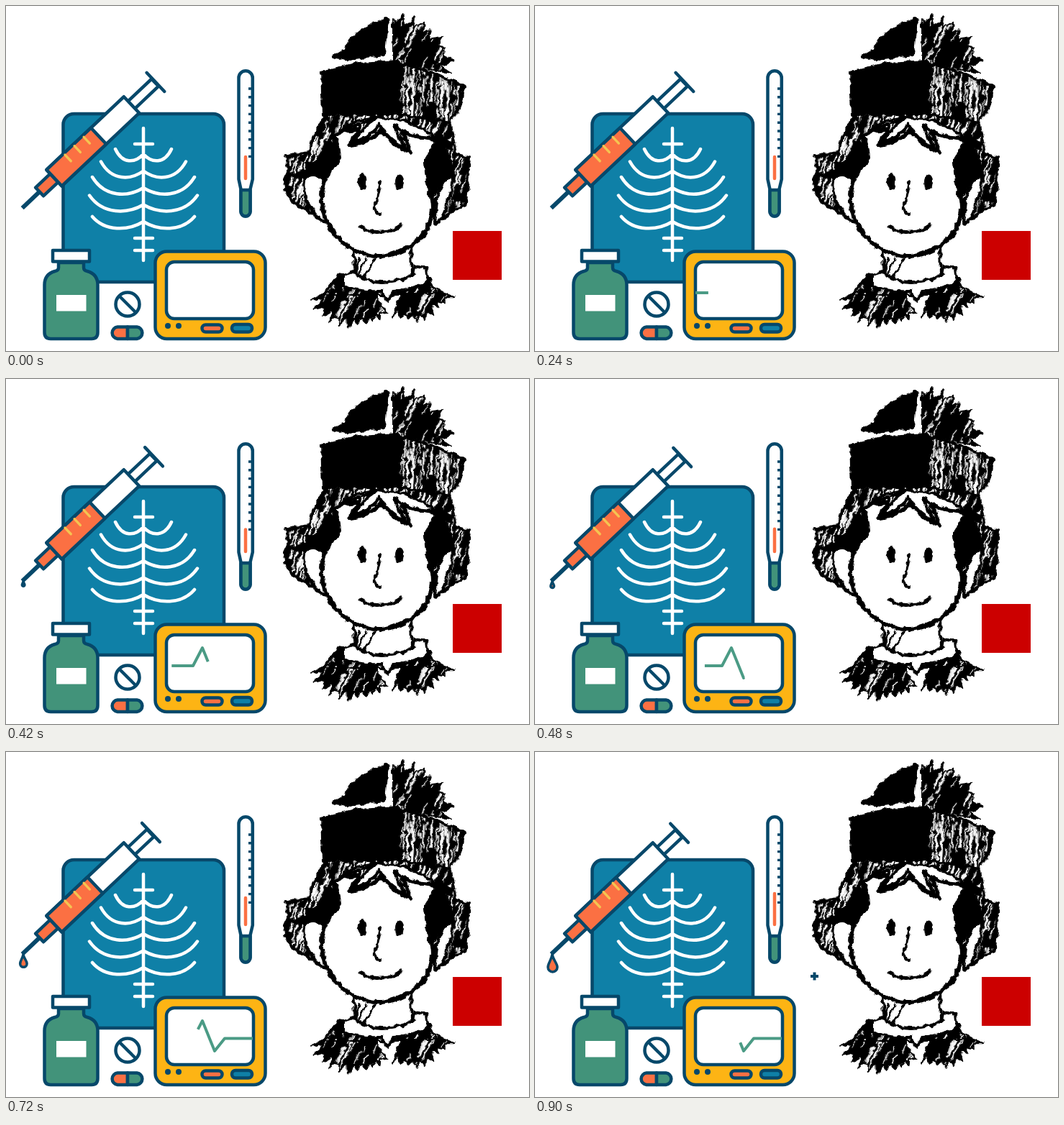
Animation, 727 px wide and 480 px high, one loop 0.96 s. Source, as an HTML page:

```html
<!DOCTYPE html>
<html lang="en">
<head>
<meta charset="utf-8">
<title>Medical kit</title>
<style>
  html, body { margin: 0; width: 100%; height: 100%; overflow: hidden; background: #fff; }
  svg { display: block; }
  .kit { stroke: #06486a; stroke-width: 4.5; stroke-linejoin: round; fill: #fff; }
  .blue { fill: #0f80a7; }
  .green { fill: #42937a; }
  .orange { fill: #fb7043; }
  .yellow { fill: #fdb414; }
  .dark { fill: #06486a; stroke: none; }
  .line { fill: none; stroke-linecap: round; }
  .ink { stroke: #000; stroke-width: 4; stroke-linejoin: round; stroke-linecap: round; filter: url(#rough); }
  .paper { fill: #fff; }
  .band { fill: url(#band); }
  .hair { fill: url(#hair); }
  .fur { fill: url(#fur); stroke-width: 2; }
</style>
</head>
<body>
<svg width="727" height="480" viewBox="0 0 727 480">
  <defs id="defs">
    <filter id="rough" color-interpolation-filters="sRGB">
      <feTurbulence type="fractalNoise" baseFrequency=".12" numOctaves="2" seed="4"/>
      <feDisplacementMap in="SourceGraphic" scale="7" xChannelSelector="R" yChannelSelector="G"/>
    </filter>
  </defs>

  <g class="kit">
    <rect class="blue" x="79.5" y="150" width="223.5" height="234" rx="15"/>
    <path id="bones" class="line" stroke="#fff"/>

    <!-- syringe, drawn along its axis -->
    <g transform="translate(174.5 137.5) rotate(136.6)">
      <g id="plunger">
        <path d="M8 -7H-45V7H8Z"/>
        <path class="line" d="M-46 -18V18"/>
      </g>
      <path d="M176 0H209" stroke-width="6"/>
      <path class="orange" d="M148 -8H176V8H148Z"/>
      <path d="M0 -15.5H148V15.5H0Z"/>
      <path id="liquid" class="orange"/>
      <path class="line" d="M79 1V13M97 1V13M115 1V13" stroke="#f5c451" stroke-width="3.4"/>
    </g>
    <path id="drop" class="orange" vector-effect="non-scaling-stroke" stroke-width="3.5"
      d="M0 0C1 8 7 12 7 18A6.5 6.5 0 0 1 -6 18C-6 12 -1 8 0 0Z"/>

    <!-- thermometer -->
    <path d="M323.5 100A9.6 9.6 0 0 1 342.8 100V241L339.5 255V286A6.5 6.5 0 0 1 326.5 286V255L323.5 241Z"/>
    <path class="green" d="M326.5 256H339.5V286A6.5 6.5 0 0 1 326.5 286Z"/>
    <path id="scale" stroke-width="3.4"/>
    <path id="mercury" class="line" stroke="#fb7043"/>

    <!-- bottle and pills -->
    <path class="green" d="M73 357V364Q73 368 68 369Q53.5 373 53.5 388V454Q53.5 463 62 463H119Q127.5 463 127.5 454V388Q127.5 373 113 369Q108 368 108 364V357Z"/>
    <path d="M65 340H116V355.5H65Z"/>
    <path stroke="none" d="M70 402H111.5V424.5H70Z"/>
    <circle cx="169" cy="415" r="16.5"/>
    <path d="M158 404L180 426"/>
    <path class="orange" d="M169 446.5H155A8.3 8.3 0 0 0 155 463H169Z"/>
    <path class="green" d="M169 446.5H182A8.3 8.3 0 0 1 182 463H169Z"/>

    <!-- monitor -->
    <rect class="yellow" x="207.5" y="341.5" width="153" height="121.5" rx="16"/>
    <rect x="223" y="356" width="121" height="79" rx="11"/>
    <path id="pulse" class="line" pathLength="174" d="M223 399H260L273 374L290 416L304 398.5H343"
      stroke="#4b9b85" stroke-width="4" style="stroke-linecap:butt"/>
    <circle class="dark" cx="225" cy="445" r="4"/>
    <circle class="dark" cx="240" cy="445" r="4"/>
    <rect class="orange" x="272.5" y="443.5" width="28" height="10" rx="5"/>
    <rect class="blue" x="314" y="443" width="28" height="10.5" rx="5"/>
    <path id="spark" d="M383 312H394M388.5 306.5V317.5" stroke-width="4"/>
  </g>

  <g class="ink">
    <!-- hair and ears -->
    <path class="hair" d="M442 154L427 183L421 204L390 209L393 227L387 240L388 255L400 274L446 300L464 220L480 155Z"/>
    <path class="hair" d="M590 160H617L625 206L644 211L639 274L597 301L584 212Z"/>
    <path d="M452 190L462 212L442 240L396 236L421 228Z"/>
    <path class="paper" d="M441 240Q421 230 414 243Q411 260 424 281Q431 296 444 301Z"/>
    <path class="paper" d="M596 303L600 262Q609 238 620 235Q624 250 613 275Q609 297 596 303Z"/>
    <path d="M590 205L606 181L622 234L604 246L588 274L583 224Z"/>

    <!-- neck, coat and collar -->
    <path class="paper" d="M483 335L486 378Q525 392 564 376L563 330Z"/>
    <path class="line" stroke-width="3" d="M490 350L486 378M500 351L488 380M514 352L494 381"/>
    <path id="coatLeft" class="fur"/>
    <path id="coatRight" class="fur"/>
    <path class="paper" d="M484 369L469 374V389Q492 399 522 397L530 412L539 397Q572 393 587 383L585 365L568 362L566 374Q551 383 525 384Q499 385 484 369Z"/>

    <!-- face -->
    <path class="hair" d="M446 150H612L599 187H456Z"/>
    <path class="paper" stroke-width="6" d="M456 181Q462 194 463 212Q444 233 440 254Q436 280 446 300Q456 322 478 336Q500 349 522 348Q548 345 567 331Q587 316 592 290Q595 276 589 258L583 218L599 187L553 177L561 203Q541 195 522 173Q506 190 478 193L490 174Q470 170 456 181Z"/>
    <path class="paper" d="M459 180Q482 165 512 158Q496 169 482 190Q505 183 519 165Q532 187 556 199Q545 184 541 166Q557 181 598 184Q575 165 544 158L515 155Q481 157 459 180Z"/>
    <ellipse cx="495" cy="244" rx="4.3" ry="9"/>
    <ellipse cx="546.5" cy="245" rx="3.5" ry="8.5"/>
    <path class="line" d="M521 244Q518 261 513 280Q512 289 519 289"/>
    <path class="line" stroke-width="5" d="M493 308Q506 316 522 314Q540 313 549 305"/>

    <!-- hat -->
    <path d="M530 18Q492 28 468 62L455 70L474 74L526 68Z"/>
    <path id="pompom" class="fur"/>
    <path class="band" d="M540 78L597 94L637 112L632 138L617 162L540 149Z"/>
    <path d="M439 92L490 80L545 77L548 148L441 151Z"/>
  </g>

  <rect x="621" y="313" width="68" height="68" fill="#c00"/>
</svg>
<script>
const el = id => document.getElementById(id);
const set = (id, name, value) => el(id).setAttribute(name, value);
const repeat = (count, make) => Array.from({ length: count }, (_, i) => make(i)).join('');

let seed = 7;
const random = (low, high) => {
  seed = seed * 16807 % 2147483647;
  return low + (high - low) * seed / 2147483647;
};

// Black tile with random white strokes, leaning by an angle
function hatch(id, angle, count) {
  const strokes = repeat(count, () =>
    `<path d="M${random(0, 48)} ${random(-15, 55)}v${random(8, 34)}" stroke="#fff" stroke-width="${random(1, 2.4)}"/>`);
  el('defs').insertAdjacentHTML('beforeend',
    `<pattern id="${id}" width="48" height="64" patternUnits="userSpaceOnUse" patternTransform="rotate(${angle})">
      <rect width="48" height="64"/>${strokes}</pattern>`);
}
hatch('band', 3, 46);
hatch('hair', 18, 42);
hatch('fur', 28, 20);

// Tuft of spikes around a centre, from one angle and length to another
function tuft(id, x, y, angle0, angle1, length0, length1, count) {
  const spikes = repeat(count * 2 + 1, i => {
    const part = i / count / 2;
    const angle = (angle0 + (angle1 - angle0) * part) * Math.PI / 180;
    const length = (length0 + (length1 - length0) * part) * (i % 2 ? random(.75, .88) : random(.92, 1.04));
    return `L${x + length * Math.cos(angle)} ${y + length * Math.sin(angle)}`;
  });
  set(id, 'd', `M${x} ${y}${spikes}Z`);
}
tuft('pompom', 538, 77, -90, 12, 62, 85, 8);
tuft('coatLeft', 500, 375, 156, 62, 87, 62, 10);
tuft('coatRight', 560, 375, 26, 112, 68, 62, 8);
el('coatLeft').setAttribute('d', el('coatLeft').getAttribute('d') + 'M463 372L440 402H525V385Z');
el('coatRight').setAttribute('d', el('coatRight').getAttribute('d') + 'M585 370L598 400H535V385Z');

const ribs = repeat(5, i => {
  const y = 206 + 23.5 * i;
  const width = 75 - 4 * (i - 3) ** 2;
  const tip = y - 15 + 2 * (i - 2) ** 2;
  return [-width, width].map(w =>
    `M${191 + w} ${tip}C${191 + w * .75} ${y + 14} ${191 + w * .3} ${y + 13} 191 ${y}`).join('');
});
set('bones', 'd', 'M191 170V354M179 192H204M179 323H204M179 340H204' + ribs);
set('scale', 'd', repeat(9, i => `M337 ${115 + i * 11.8}h5`));

const ramp = (value, start, end) => Math.min(1, Math.max(0, (value - start) / (end - start)));
const smooth = t => t * t * (3 - 2 * t);

function draw(now) {
  const step = Math.floor(now % 960 / 60);

  const push = 10 * ramp(step, 4, 13);
  const level = 63 + push * .75;
  set('plunger', 'transform', `translate(${push})`);
  set('liquid', 'd', `M${level} -15.5H148V15.5H${level}Z`);

  const size = ramp(step, 4, 15);
  set('drop', 'transform', `translate(24 281.5) scale(${size})`);
  set('drop', 'visibility', size ? 'visible' : 'hidden');

  set('mercury', 'd', `M333 ${210 - 13 * ramp(step, 6, 15) ** 1.5}V240`);

  const head = 174 * smooth(ramp(step, 2, 12));
  const tail = 99 * ramp(step, 4, 15) ** 2;
  set('pulse', 'stroke-dasharray', `0 ${tail} ${head - tail} 999`);
  set('pulse', 'visibility', head ? 'visible' : 'hidden');
  set('spark', 'visibility', step === 15 ? 'visible' : 'hidden');

  requestAnimationFrame(draw);
}
requestAnimationFrame(draw);
</script>
</body>
</html>
```
